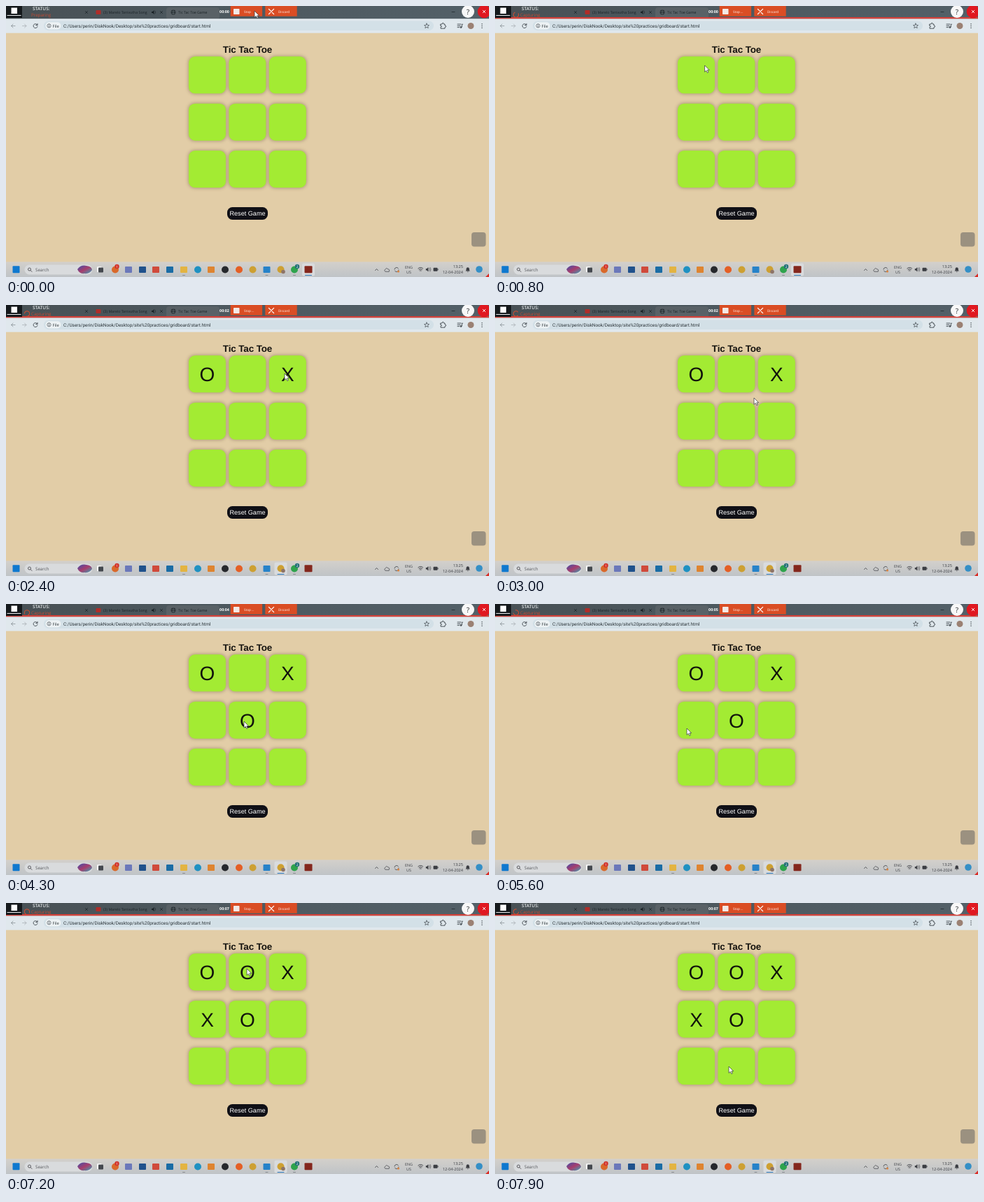
These frames come from a looping animation (690 px wide and 388 px high, 8000 ms). An HTML page:

```html
<!DOCTYPE html>
<html lang="en">
<head>
<meta charset="utf-8">
<title>Tic Tac Toe</title>
<style>
html, body { margin: 0; width: 100%; height: 100%; overflow: hidden; background: #e2cda7; }
svg { display: block; width: 690px; height: 388px; }
text { font-family: "Open Sans", "Noto Sans", sans-serif; text-rendering: geometricPrecision; }
.arial { font-family: "Liberation Sans", Arial, sans-serif; }
.path { font-family: Roboto, sans-serif; }
.line { fill: none; stroke-linecap: round; stroke-linejoin: round; }
</style>
</head>
<body>
<svg id="stage" viewBox="0 0 690 388" xmlns="http://www.w3.org/2000/svg">
  <defs>
    <filter id="glow" x="-30%" y="-30%" width="160%" height="160%"><feGaussianBlur stdDeviation="2.8"/></filter>
    <linearGradient id="scene" x2="1" y2="1">
      <stop stop-color="#3d4fae"/><stop offset=".5" stop-color="#a83d6c"/><stop offset="1" stop-color="#38a3b8"/>
    </linearGradient>
    <linearGradient id="header">
      <stop stop-color="#485054"/><stop offset=".35" stop-color="#4c575d"/><stop offset="1" stop-color="#536068"/>
    </linearGradient>
    <linearGradient id="dock" x2="0" y2="1">
      <stop stop-color="#d3d0cb"/><stop offset="1" stop-color="#bfc3c7"/>
    </linearGradient>
  </defs>
  <rect width="690" height="388" fill="#e2cda7"/>
  <g id="tabs"></g>
  <g id="toolbar"></g>
  <g id="page"></g>
  <g id="taskbar"></g>
  <g id="recorder"></g>
  <path id="cursor" d="M0 0V9.4L2.2 7.4L3.8 10.6L5.3 9.9L3.8 6.8H6.7Z" fill="#fff" stroke="#30343c" stroke-width=".7"/>
</svg>
<script>
const LOOP = 8000;
const byId = id => document.getElementById(id);

function add(parent, tag, attrs, content) {
  const el = document.createElementNS("http://www.w3.org/2000/svg", tag);
  for (const key in attrs) el.setAttribute(key, attrs[key]);
  if (content !== undefined) el.textContent = content;
  parent.appendChild(el);
  return el;
}
const rect = (p, x, y, width, height, fill, rx = 0, more) => add(p, "rect", { x, y, width, height, fill, rx, ...more });
const circle = (p, cx, cy, r, fill, more) => add(p, "circle", { cx, cy, r, fill, ...more });
const label = (p, x, y, size, fill, words, more) => add(p, "text", { x, y, "font-size": size, fill, ...more }, words);
const stroke = (p, d, color, width = .8) => add(p, "path", { d, stroke: color, "stroke-width": width, class: "line" });
const cross = (p, x, y, r, color, width) =>
  stroke(p, `M${x - r} ${y - r}L${x + r} ${y + r}M${x + r} ${y - r}L${x - r} ${y + r}`, color, width);
const middle = { "text-anchor": "middle" };
const end = { "text-anchor": "end" };

function drawTabs(g) {
  const ink = "#1b2327";
  rect(g, 0, 0, 690, 19, "url(#header)");
  rect(g, 229, 2, 76, 17, "#596166", 4);
  cross(g, 115, 9, 1.6, ink, .7);
  rect(g, 128.5, 6, 7, 6, "#b02d29", 1);
  label(g, 139, 11, 5.2, ink, "(3) Marelo Tanivutha Song");
  add(g, "path", { d: "M208 8h1.5l2-2v6l-2-2h-1.5z", fill: ink });
  stroke(g, "M213 7q1.5 2 0 4", ink, .6);
  cross(g, 222, 9, 1.6, ink, .7);
  circle(g, 239, 9, 3.4, "#242c30");
  stroke(g, "M236.5 8h5M237 10.5h4M239 6v6", "#7b858b", .5);
  label(g, 246, 11, 5.2, ink, "Tic Tac Toe Game");
  stroke(g, "M637 8.5h4", ink, .7);
}

function drawToolbar(g) {
  const ink = "#3f474c";
  rect(g, 0, 18.2, 690, 20.5, "#e0e8ed");
  rect(g, 54, 21.5, 557, 13.5, "#d3e0e7", 6.7);
  stroke(g, "M13 28.5H7.5M10 26L7.5 28.5L10 31", "#8b9499");
  stroke(g, "M23.5 28.5H29M26.5 26L29 28.5L26.5 31", "#aab2b6");
  stroke(g, "M44.8 27.2A3 3 0 1 0 45 29.4M45 25.3V27.5H42.8", ink, .9);
  rect(g, 56.5, 23.2, 22, 10.2, "#edf2f4", 5);
  circle(g, 61.5, 28.3, 2.6, "none", { stroke: ink, "stroke-width": .7 });
  stroke(g, "M61.5 28V29.7M61.5 26.8V26.9", ink, .7);
  label(g, 66.5, 30.5, 5.8, "#30383c", "File");
  label(g, 82, 30.7, 6.45, "#293136", "C:/Users/perin/DiskNook/Desktop/site%20practices/gridboard/start.html", { class: "path" });
  stroke(g, "M601 25l1 2.3 2.5.2-1.9 1.6.6 2.5-2.2-1.3-2.2 1.3.6-2.5-1.9-1.6 2.5-.2z", ink, .7);
  stroke(g, "M621 26h2q0-1.8 1.2-1.8T625.4 26H627v2q1.6 0 1.6 1.2T627 30.4v1.8h-6v-2q1.5-.1 1.5-1t-1.5-1z", ink, .9);
  stroke(g, "M645 26h5M645 28.3h4M645 30.6h2.5M651.3 30V26.2h1.3", ink, .9);
  circle(g, 649.9, 30.5, 1.3, ink);
  circle(g, 664, 28.5, 4.5, "#9b8173");
  for (const y of [25.8, 28.5, 31.2]) circle(g, 680, y, .75, ink);
}

const cellX = col => 261 + 57.4 * col;
const cellY = row => 72.3 + 67.4 * row;

function drawPage(g) {
  label(g, 345, 67, 13.4, "#15130f", "Tic Tac Toe",
    { ...middle, class: "arial", "font-weight": 700, "letter-spacing": -.1 });
  for (let row = 0; row < 3; row++) for (let col = 0; col < 3; col++) {
    const x = cellX(col), y = cellY(row);
    rect(g, x - .6, y - .6, 54.2, 54.2, "#5d4a2d", 9, { opacity: .42, filter: "url(#glow)" });
    rect(g, x, y, 53, 53, "#a3eb33", 9);
  }
  rect(g, 316, 288, 58, 18, "#101016", 7.5);
  label(g, 345, 300.2, 9.1, "#fff", "Reset Game", { ...middle, class: "arial" });
  rect(g, 665, 324, 20.5, 20.5, "#9b9180", 4);
}

function drawTaskbar(g) {
  const ink = "#3b3d42", highlight = "#d9dbdd";
  rect(g, 0, 366.3, 690, 22, "url(#dock)");
  rect(g, 9.5, 372.3, 10, 10, "#0f78cf", 1);
  rect(g, 26.5, 370.5, 97, 14, highlight, 7);
  circle(g, 33.5, 377, 2, "none", { stroke: ink, "stroke-width": .8 });
  stroke(g, "M35 378.5l2 2", ink);
  label(g, 42, 380, 6.2, "#55575b", "Search");
  add(g, "path", { d: "M102 377q5-7 13-5 8 1 8 6-4 6-11 5-7 1-10-6z", fill: "url(#scene)" });
  rect(g, 130, 373, 6.5, 8, "#f5f5f5", 1);
  rect(g, 132, 374.5, 7, 7, "#44484e", 1);

  const dots = [[156, "#d9692b"], [274, "#1f91c2"], [313, "#26282c"], [333, "#e45f25"], [352.5, "#cda032"], [412, "#2fa34d"]];
  const squares = [[175, "#6b78ba"], [195, "#20518c"], [214, "#d04a3b"], [234, "#1a6ca5"], [254, "#e3b442"], [293, "#de8430"], [372.5, "#2682c9"]];
  for (const [x, fill] of dots) circle(g, x, 377.5, 5, fill);
  for (const [x, fill] of squares) rect(g, x - 5, 373, 10, 9, fill, 1);
  for (const [x, fill, count] of [[158.5, "#d2332b", 1], [416, "#246f78", 2]]) {
    circle(g, x, 373, 3.2, fill);
    label(g, x, 374.8, 4.8, "#fff", count, middle);
  }
  const active = rect(g, 423, 368.5, 18, 18, highlight, 2);
  circle(g, 392.5, 377.3, 5, "#cda032");
  circle(g, 396, 380.5, 2.8, "#8d7468");
  rect(g, 426.5, 372.3, 11, 10, "#84271d", 1);
  for (const x of [254, 372.5, 412]) rect(g, x - 2, 385, 4, 1, "#85898e", .5);
  const bar = rect(g, 427, 385, 10, 1.1, "#2876ba", .5);

  stroke(g, "M527.5 378.5l2-2 2 2", ink);
  stroke(g, "M541.5 380q-2-1.8.3-3 1.5-3 4-.3 2.8.5 1.5 3.3z", ink, .7);
  stroke(g, "M555 377a3 3 0 0 1 5.5-1.2M561 378a3 3 0 0 1-5.5 1.2", ink, .8);
  circle(g, 560.5, 380, 1.6, "#d98543");
  label(g, 575.5, 375.6, 5.3, ink, "ENG", middle);
  label(g, 575.5, 382.6, 5.3, ink, "US", middle);
  stroke(g, "M588.8 375.8q3.4-3 6.8 0M590 377.4q2.2-2 4.4 0M591.2 379q1-.9 2 0", ink, .9);
  add(g, "path", { d: "M599.8 376h1.5l2-2v6.5l-2-2h-1.5z", fill: ink });
  stroke(g, "M604.6 375.4q1.4 1.8 0 3.6M606 374.3q2.2 3 0 5.8", ink, .6);
  rect(g, 610.5, 374.8, 6, 5, ink, 1);
  rect(g, 616.5, 376.3, 1, 2, ink);
  label(g, 653, 375.4, 5.6, ink, "13:25", end);
  label(g, 653, 382.8, 5.6, ink, "12-04-2024", end);
  add(g, "path", { d: "M656.5 379.5l1-1.3v-2q.2-2 2.2-2t2.2 2v2l1 1.3zM658.8 380.2h2l-1 1z", fill: ink });
  circle(g, 676, 377, 4.8, "#348fc6");
  add(g, "path", { d: "M690 383v5h-5z", fill: "#d92c25" });
  return { active, bar };
}

function drawRecorder(g) {
  const frame = rect(g, 0, 16, 690, 2.2, "#d6423a");
  rect(g, 0, 0, 23, 17, "#15191c");
  rect(g, 7.5, 2.5, 8.5, 8.5, "#fff");
  rect(g, 1.5, 13, 20, 1, "#e9ecee");
  label(g, 38, 5.8, 6.5, "#e4e7e9", "STATUS:", { "font-weight": 600 });
  const status = label(g, 36, 15.2, 6.2, "#c74a33", "Capturing");
  const spinner = stroke(g, "M2.6 -2.6A3.7 3.7 0 1 0 2.6 2.6", "#d04d30", 1);
  const timer = label(g, 312, 10, 5.4, "#fff", "00:00", { ...middle, "font-weight": 700 });
  for (const x of [320.7, 370.3]) rect(g, x, 0, 45.4, 14.7, "#da4d24");
  rect(g, 325, 4, 8.5, 8, "#f3e9e5", .7);
  cross(g, 379, 8, 3.6, "#fff", 1.3);
  const stop = label(g, 340, 9.8, 4.6, "#fff", "Stop");
  label(g, 389, 9.8, 4.6, "#fff", "Discard");
  circle(g, 660, 8, 9, "#f8f8f8");
  label(g, 660, 11.6, 10, "#25292c", "?", middle);
  circle(g, 683, 8, 9.3, "#e01820");
  cross(g, 683, 8, 1.8, "#fff", .9);
  return { frame, status, spinner, timer, stop };
}

drawTabs(byId("tabs"));
drawToolbar(byId("toolbar"));
drawPage(byId("page"));
const task = drawTaskbar(byId("taskbar"));
const rec = drawRecorder(byId("recorder"));

// Each move: time, column, row, mark.
const moves = [[1150, 0, 0, "O"], [2150, 2, 0, "X"], [3850, 1, 1, "O"], [5750, 0, 1, "X"], [6850, 1, 0, "O"]]
  .map(([time, col, row, mark]) => ({
    time,
    el: label(byId("page"), cellX(col) + 26.5, cellY(row) + 36.9, 28, "#11130c", mark, { ...middle, class: "arial" })
  }));

// Pointer stops: time, x, y.
const stops = [
  [0, 355, 7], [300, 355, 7], [950, 291, 97], [1250, 291, 97], [1600, 356, 96], [1950, 398, 98],
  [2450, 398, 98], [3000, 370, 133], [3550, 340, 168], [4500, 340, 168], [5300, 274, 178],
  [5900, 274, 178], [6300, 344, 94], [7200, 344, 94], [7900, 334, 234], [8000, 334, 234]
];

function pointerAt(t) {
  const i = Math.max(1, stops.findIndex(s => s[0] > t));
  const [t0, x0, y0] = stops[i - 1], [t1, x1, y1] = stops[i];
  const u = (t - t0) / (t1 - t0), k = u * u * (3 - 2 * u);
  return [x0 + (x1 - x0) * k, y0 + (y1 - y0) * k];
}

const show = (el, on) => el.setAttribute("visibility", on ? "visible" : "hidden");

function render(t) {
  const started = t >= 300, clicked = t >= 1150;
  byId("cursor").setAttribute("transform", `translate(${pointerAt(t)})`);
  for (const { time, el } of moves) show(el, t >= time);
  rec.timer.textContent = "00:0" + Math.max(0, Math.floor((t - 150) / 1000));
  rec.stop.textContent = started ? "Stop ..." : "Stop";
  rec.status.textContent = started ? "Capturing" : "Preparing";
  show(rec.frame, started);
  show(rec.spinner, started);
  rec.spinner.setAttribute("transform", `translate(30 12.5) rotate(${t * .36})`);
  task.active.setAttribute("x", clicked ? 383.5 : 423);
  task.bar.setAttribute("x", clicked ? 387.5 : 427);
}

function tick(now) {
  render(now % LOOP);
  requestAnimationFrame(tick);
}
render(0);
requestAnimationFrame(tick);
</script>
</body>
</html>
```
